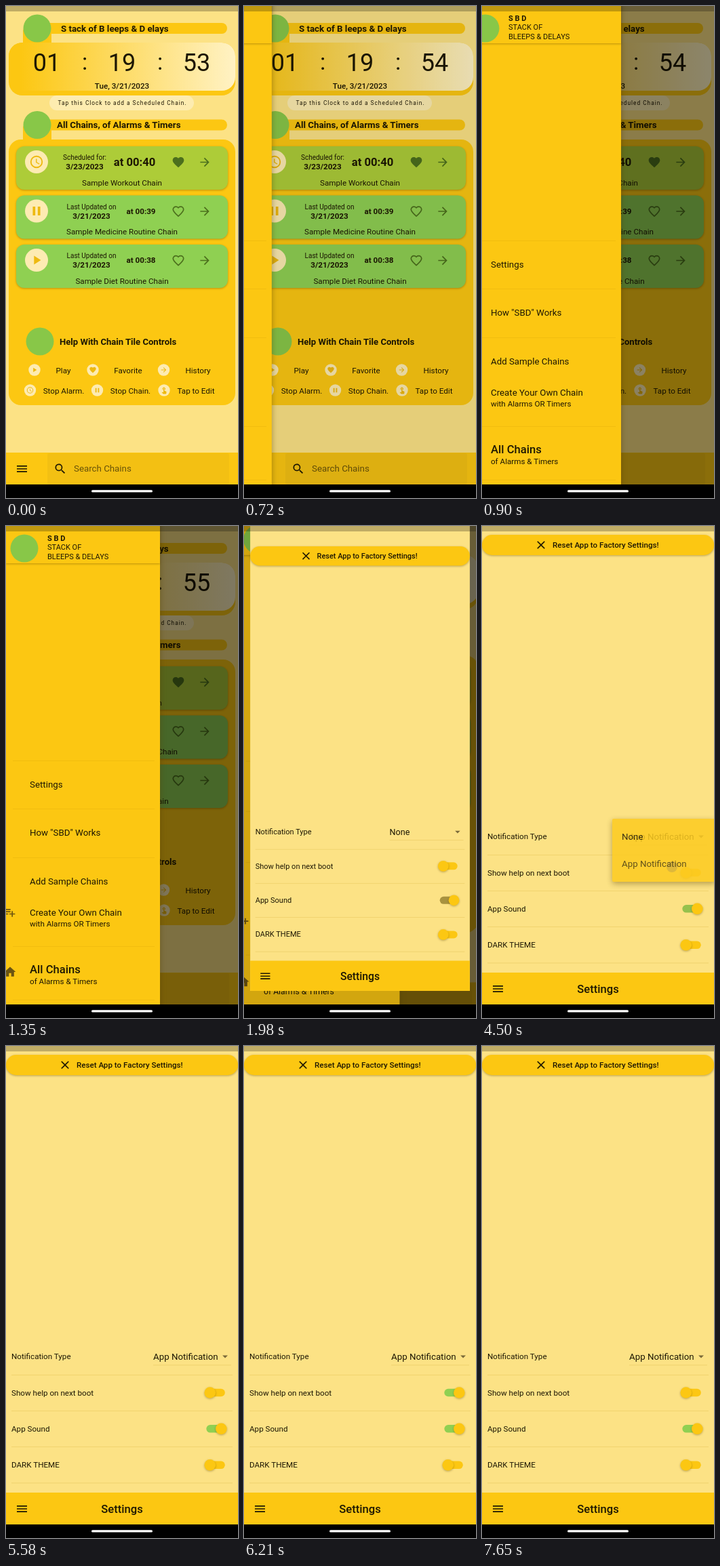
Recreate the animation shown at these times as an HTML page. Size 342 by 726 pixels, loop 8 s.

```html
<!DOCTYPE html>
<html lang="en">
<head>
<meta charset="utf-8">
<title>Alarm chains</title>
<style>
  html, body { margin: 0; width: 100%; height: 100%; overflow: hidden; background: #000; }
  svg { display: block; width: 342px; height: 726px; font-family: Roboto, Arial, sans-serif; }
  text { white-space: pre; }
  .lift { filter: drop-shadow(0 1.5px 1.5px rgba(90, 65, 0, .4)); }
  .float { filter: drop-shadow(0 3px 4px rgba(90, 65, 0, .5)); }
</style>
</head>
<body>
<svg id="stage" viewBox="0 0 342 726"></svg>
<script>
const INK = '#1d1703', GOLD = '#fcc712', PALE = '#fce285', CREAM = '#fdebb2';
const LEAF = '#8fd052', LOGO = '#88c748', MOSS = '#4c6f1d';
const DRAWER_W = 227, PIVOT = [171, 331];

const ICONS = {
  menu: 'M3 18h18v-2H3zm0-5h18v-2H3zm0-7v2h18V6z',
  search: 'M15.5 14h-.8l-.3-.3A6.5 6.5 0 1 0 13.7 14.4l.3.3v.8l5 5L20.5 19zm-6 0a4.5 4.5 0 1 1 0-9 4.5 4.5 0 0 1 0 9z',
  close: 'M19 6.4 17.6 5 12 10.6 6.4 5 5 6.4 10.6 12 5 17.6 6.4 19 12 13.4 17.6 19 19 17.6 13.4 12z',
  arrow: 'm12 4-1.4 1.4L16.2 11H4v2h12.2l-5.6 5.6L12 20l8-8z',
  heart: 'M12 21.3l-1.4-1.3C5.4 15.4 2 12.3 2 8.5 2 5.4 4.4 3 7.5 3c1.7 0 3.4.8 4.5 2.1C13.1 3.8 14.8 3 16.5 3 19.6 3 22 5.4 22 8.5c0 3.8-3.4 6.9-8.5 11.5z',
  play: 'M8 5v14l11-7z',
  pause: 'M6 19h4V5H6zm8-14v14h4V5z',
  clock: 'M12 2a10 10 0 1 0 0 20 10 10 0 0 0 0-20zm0 18a8 8 0 1 1 0-16 8 8 0 0 1 0 16zM12.5 7H11v6l5.2 3.2.8-1.3-4.5-2.7z',
  tap: 'M9 11.2V7.5a2.5 2.5 0 0 1 5 0v3.7a4.5 4.5 0 1 0-5 0zm9.8 4.7-4.5-2.3H13v-6a1.5 1.5 0 0 0-3 0v10.7l-3.4-.7-1.8 1.1 4.9 4.9h8.9l1-6.5z',
  home: 'M10 20v-6h4v6h5v-8h3L12 3 2 12h3v8z',
  listAdd: 'M14 10H2v2h12zm0-4H2v2h12zm4 8v-4h-2v4h-4v2h4v4h2v-4h4v-2zM2 16h8v-2H2z',
  drop: 'M7 10l5 5 5-5z'
};

const text = (s, x, y, size = 11.65, weight = 400, anchor = 'start', more = '') =>
  `<text x="${x}" y="${y}" font-size="${size}" font-weight="${weight}" text-anchor="${anchor}" fill="${INK}" ${more}>${s.replace(/&/g, '&amp;')}</text>`;
const mid = (s, x, y, size, weight, more) => text(s, x, y, size, weight, 'middle', more);
const rect = (x, y, w, h, r, fill, more = '') =>
  `<rect x="${x}" y="${y}" width="${w}" height="${h}" rx="${r}" fill="${fill}" ${more}/>`;
const disc = (x, y, r, fill, more = '') => `<circle cx="${x}" cy="${y}" r="${r}" fill="${fill}" ${more}/>`;
const icon = (name, x, y, size, fill = INK, more = '') =>
  `<path d="${ICONS[name]}" fill="${fill}" ${more} transform="translate(${x} ${y}) scale(${size / 24}) translate(-12 -12)"/>`;
const badge = (name, x, y, r) => disc(x, y, r, CREAM) + icon(name, x, y, r * 1.3, '#eeb90f');
const line = (x1, x2, y) => rect(x1, y, x2 - x1, 0.8, 0, '#b58a00', 'opacity=".22"');
const burger = y => icon('menu', 23.5, y, 20);

function header(y, title, x, last) {
  return rect(30, y - 8, 296, 16, 8, GOLD) + rect(25, y, 42, last - y, 4, GOLD) +
    disc(46, y, 20.5, LOGO) + text(title, x, y + 4.5, 13.3, 700);
}

function tile(y, o) {
  const at = o.big ? mid('at ' + o.time, 189.5, y + 29, 16.6, 700) : mid('at ' + o.time, 199, y + 27, 11.65, 700);
  const heart = o.big ? icon('heart', 254, y + 23.5, 20, MOSS)
    : icon('heart', 254, y + 23.5, 18.5, 'none', `stroke="${MOSS}" stroke-width="2.2"`);
  return rect(15, y, 312, 64, 12, o.big ? '#adcc38' : LEAF, 'class="lift"') +
    badge(o.icon, 45, y + 23, 17) +
    mid(o.label, o.cx, y + 20, 10) + mid(o.date, o.cx, y + 34, 11.65, 700) +
    at + heart + icon('arrow', 293, y + 23.5, 20, MOSS) + mid(o.name, 171, y + 57.5);
}

function home() {
  const legend = [
    ['play', 42, 537, 'Play', 84.5], ['heart', 128, 537, 'Favorite', 180], ['arrow', 232.5, 537, 'History', 283],
    ['clock', 35.5, 567, 'Stop Alarm.', 85], ['pause', 134.5, 567, 'Stop Chain.', 183.5], ['tap', 233, 567, 'Tap to Edit', 280]
  ];
  return rect(0, -50, 342, 756, 0, PALE) +
    header(33, 'S tack of B leeps & D elays', 81, 60) +
    rect(4, 54, 334, 78, 20, GOLD) + rect(4, 54, 334, 71, 20, 'url(#shine)') +
    mid('01', 60, 95.5, 36) + mid(':', 116, 93.5, 34) + mid('19', 171, 95.5, 36) + mid(':', 227, 93.5, 34) +
    mid('53', 281, 95.5, 36, 400, 'id="sec"') +
    mid('Tue, 3/21/2023', 171, 122, 11.65, 500) +
    rect(64, 132, 213, 22, 11, '#fdecb0') +
    mid('Tap this Clock to add a Scheduled Chain.', 171.5, 145.5, 8.3, 400, 'letter-spacing="1"') +
    header(175.5, 'All Chains, of Alarms & Timers', 75, 205) +
    rect(4, 197, 334, 392, 18, GOLD) +
    tile(207, { big: 1, icon: 'clock', label: 'Scheduled for:', date: '3/23/2023', cx: 116, time: '00:40', name: 'Sample Workout Chain' }) +
    tile(279.5, { icon: 'pause', label: 'Last Updated on', date: '3/21/2023', cx: 126, time: '00:39', name: 'Sample Medicine Routine Chain' }) +
    tile(352, { icon: 'play', label: 'Last Updated on', date: '3/21/2023', cx: 126, time: '00:38', name: 'Sample Diet Routine Chain' }) +
    disc(50, 495, 20.5, LOGO) + text('Help With Chain Tile Controls', 79, 499.5, 13.1, 700) +
    legend.map(([name, x, y, s, cx]) => badge(name, x, y, 8.7) + mid(s, cx, y + 4.5)).join('') +
    rect(0, 659, 342, 60, 0, GOLD) + rect(61, 660, 268, 46, 3, '#f3c013') +
    burger(683) + icon('search', 80, 683, 20) + text('Search Chains', 100, 687.2, 13.3, 400, 'start', 'opacity=".65"');
}

function drawer() {
  const x = 35;
  return rect(0, -50, DRAWER_W, 770, 0, GOLD, 'class="float"') +
    rect(0, -50, DRAWER_W, 105, 0, GOLD, 'class="lift"') +
    disc(27, 33, 20.5, LOGO) +
    text('S B D', 61, 22, 11, 700) + text('STACK OF', 61, 35, 11) + text('BLEEPS & DELAYS', 61, 49, 11) +
    [346, 417, 489, 620, 699].map(y => line(10, DRAWER_W - 8, y)).join('') +
    text('Settings', x, 386, 13.3) + text('How "SBD" Works', x, 457.3, 13.3) +
    text('Add Sample Chains', x, 529, 13.3) +
    icon('listAdd', 5, 570, 20, '#6b5412') +
    text('Create Your Own Chain', x, 575, 13.3) + text('with Alarms OR Timers', x, 591.3) +
    icon('home', 6, 658, 20, '#6b5412') +
    text('All Chains', x, 660, 16.6, 500) + text('of Alarms & Timers', x, 676.3);
}

const toggle = (id, y) => `<g id="${id}">` +
  rect(295.3, y - 5.8, 27.5, 11.6, 5.8, GOLD) + disc(300.7, y, 16.6, LEAF, 'opacity="0"') +
  disc(300.7, y, 8.3, GOLD, 'class="lift"') + '</g>';

function settings() {
  return rect(0, -44, 342, 750, 0, PALE) +
    rect(0, 13, 342, 30, 15, GOLD, 'class="lift"') +
    icon('close', 87, 28, 20) + text('Reset App to Factory Settings!', 104, 32.2, 11.6, 500) +
    text('Notification Type', 8, 462.2) + text('Show help on next boot', 8, 515.5) +
    text('App Sound', 8, 568.7) + text('DARK THEME', 8, 622) +
    [485, 538, 591, 644.5].map(y => line(8, 334, y)).join('') + line(217, 332, 470.5) +
    text('None', 217, 462.7, 13.3, 400, 'start', 'id="value"') + icon('drop', 323, 458, 19, '#7a6a3a') +
    toggle('help', 511.5) + toggle('sound', 564.8) + toggle('dark', 618.3) +
    rect(0, 659, 342, 47, 0, GOLD) + burger(683) + mid('Settings', 171, 689, 16.6, 500);
}

const menu = () => rect(192, 438, 152, 40, 2, '#fccb22', 'id="sheet" class="float"') +
  `<g clip-path="url(#sheetClip)">${disc(280, 503, 8, '#9a8448', 'id="press" opacity="0"')}` +
  `<g id="first">${text('None', 206, 462.7, 13.3)}</g><g id="second">${text('App Notification', 206, 502.5, 13.3)}</g></g>`;

document.getElementById('stage').innerHTML = `
  <defs>
    <linearGradient id="shine"><stop offset=".05" stop-color="${GOLD}"/><stop offset="1" stop-color="#fff2c4"/></linearGradient>
    <clipPath id="screen"><rect width="342" height="706"/></clipPath>
    <clipPath id="sheetClip"><rect id="sheetHole" x="192" width="152"/></clipPath>
  </defs>
  <g clip-path="url(#screen)">
    <g id="under">
      ${home()}
      ${rect(-20, -50, 382, 770, 0, '#000', 'id="dim"')}
      <g id="drawer">${drawer()}</g>
    </g>
    ${rect(0, 0, 342, 706, 0, '#000', 'id="veil"')}
    <g id="page">${settings()}</g>
    <g id="menu">${menu()}</g>
    ${rect(0, 0, 342, 8, 0, '#000', 'opacity=".24"')}
  </g>
  ${rect(0, 706, 342, 20, 0, '#000')}${rect(126, 714.3, 90, 3.2, 1.6, '#fff')}`;

const $ = id => document.getElementById(id);
const set = (el, attrs) => { for (const k in attrs) el.setAttribute(k, attrs[k]); };

// Piecewise linear value from [time, value] steps
function at(t, steps) {
  let i = steps.findIndex(s => s[0] > t);
  if (i < 0) return steps[steps.length - 1][1];
  if (!i) return steps[0][1];
  const [t0, a] = steps[i - 1], [t1, b] = steps[i], p = (t - t0) / (t1 - t0);
  return a + (b - a) * p;
}
const mix = (a, b, p) => `rgb(${a.map((v, i) => Math.round(v + (b[i] - v) * p))})`;

const TRACKS = {
  slide: [[630, 0], [720, .18], [810, .62], [900, .903], [990, .98], [1080, 1]],
  zoom: [[1890, .85], [1980, .9466], [2070, .982], [2160, .995], [2250, 1]],
  back: [[1890, 1], [1980, 1.044], [2070, 1.05]],
  menuShow: [[3240, 0], [3330, .75], [3420, 1], [4410, 1], [4500, .86], [4590, .6], [4680, .3], [4770, .08], [4860, 0]],
  top: [[3330, 438], [3420, 434], [3510, 432]],
  bottom: [[3330, 478], [3420, 508], [3510, 525]],
  first: [[3330, .75], [3420, 1]],
  second: [[3420, .2], [3510, .7], [3600, 1], [4410, 1], [4500, .8]],
  press: [[4500, 8], [4590, 24], [4680, 44], [4770, 60]],
  help: [[5670, 0], [5760, .1], [5850, .45], [5940, .88], [6030, 1], [7110, 1], [7200, .9], [7290, .55], [7380, .12], [7470, 0]],
  ripple: [[5670, 0], [5760, .2], [5850, .3], [5940, .3], [6030, .2], [6120, .08], [6210, 0],
    [7110, 0], [7200, .2], [7290, .3], [7380, .3], [7470, .2], [7560, .08], [7650, 0]],
  sound: [[1980, 0], [2250, .55], [4410, .6], [4500, .75], [4950, 1]]
};

function drawToggle(id, pos, track, ripple = 0) {
  const [bar, glow, knob] = $(id).children, cx = 300.7 + 16.6 * pos;
  set(bar, { fill: track });
  set(glow, { cx, opacity: ripple });
  set(knob, { cx });
}

function draw(t) {
  const v = {};
  for (const k in TRACKS) v[k] = at(t, TRACKS[k]);
  const [px, py] = PIVOT;
  const scaled = s => `translate(${px} ${py}) scale(${s}) translate(${-px} ${-py})`;

  $('sec').textContent = t < 360 ? 53 : t < 1350 ? 54 : 55;
  set($('drawer'), { transform: `translate(${(v.slide - 1) * DRAWER_W})`, visibility: v.slide ? 'visible' : 'hidden' });
  set($('dim'), { opacity: v.slide * .5 });
  set($('under'), { transform: scaled(v.back) });

  const open = t >= 1980;
  set($('veil'), { opacity: open ? .17 : 0 });
  set($('page'), { transform: scaled(v.zoom), visibility: open ? 'visible' : 'hidden' });
  $('value').textContent = t < 4500 ? 'None' : 'App Notification';

  const box = { y: v.top, height: v.bottom - v.top };
  set($('menu'), { opacity: v.menuShow });
  set($('sheet'), box);
  set($('sheetHole'), box);
  set($('first'), { opacity: v.first });
  set($('second'), { opacity: v.second });
  set($('press'), { r: v.press, opacity: t >= 4500 ? .35 : 0 });

  const gold = [252, 199, 18], leaf = [143, 208, 82];
  drawToggle('help', v.help, mix(gold, leaf, v.help), v.ripple);
  drawToggle('sound', 1, mix([168, 146, 63], leaf, v.sound));
  drawToggle('dark', 0, GOLD);
}

const LOOP = 8000, TICK = 90;
const start = performance.now();
function frame() {
  const t = (performance.now() - start) % LOOP;
  draw(Math.floor(t / TICK) * TICK);
  requestAnimationFrame(frame);
}
draw(0);
requestAnimationFrame(frame);
</script>
</body>
</html>
```
